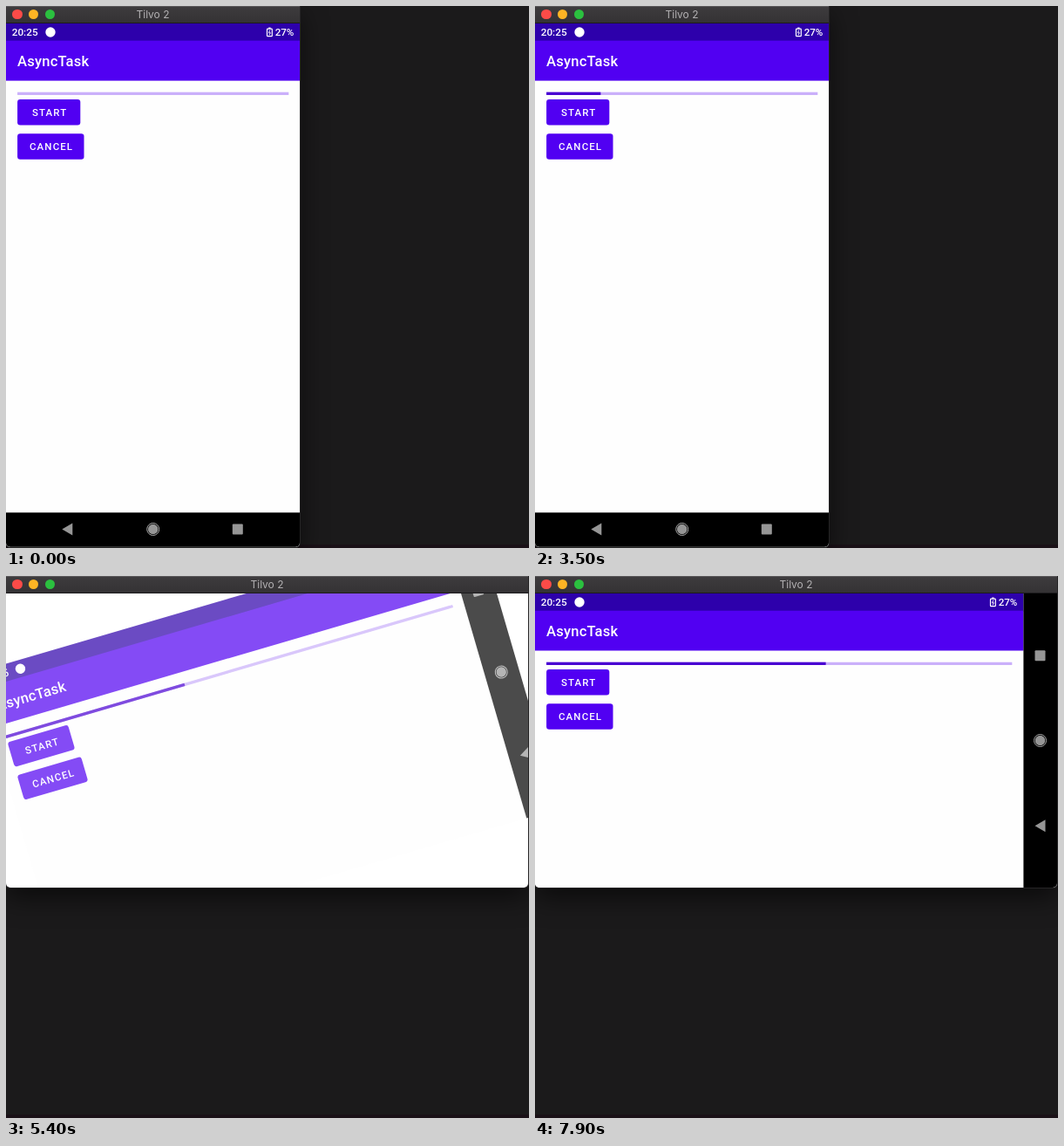
Write an HTML page that moves like this. It is 600 px wide and 621 px high and loops after 8 s.

```html
<!DOCTYPE html>
<html>
<head>
<meta charset="utf-8">
<style>
  html, body { margin: 0; width: 100%; height: 100%; overflow: hidden; }
  body { background: linear-gradient(#1b1a1b 617px, #1a1117 617px); position: relative; }
  #win {
    position: absolute; left: 0; top: 0; overflow: hidden; background: #fff;
    border-radius: 0 0 5px 5px;
    box-shadow: 0 0 0 1px #262526, 0 11px 30px rgba(0, 0, 0, .6);
  }
  #bar {
    position: relative; height: 20px; text-align: center;
    background: linear-gradient(#5a585a 1px, #3d3b3d 1px, #343234 19px, #1c1b1d 19px);
    font: 12px/19px Inter, Roboto, sans-serif; color: #b3b1b3;
  }
  #bar i { position: absolute; top: 3.7px; width: 11.4px; height: 11.4px; border-radius: 50%; }
  svg { display: block; }
  text { font-family: Roboto, sans-serif; font-weight: 500; fill: #fff; }
  .title { font-size: 16.6px; letter-spacing: .2px; }
  .btn { font-size: 11.5px; letter-spacing: 1.1px; }
</style>
</head>
<body>
<div id="win">
  <div id="bar">
    <i style="left:7.3px;background:#fc4b48"></i>
    <i style="left:26px;background:#fdb424"></i>
    <i style="left:44.6px;background:#2bc03f"></i>
    Tilvo 2
  </div>
  <svg id="view" width="600" height="601"></svg>
</div>
<script>
const LOOP = 8000, TURN = 5200, TURN_MS = 372;
const PURPLE = '#5100f2';
const SHORT = 337.4, LONG = 599.8, NAV = 39.4;   // screen sides and navigation bar
const $ = id => document.getElementById(id);

const rect = (x, y, w, h, fill, more = '') =>
  `<rect x="${x}" y="${y}" width="${w}" height="${h}" fill="${fill}" ${more}/>`;
const label = (x, y, s, more) => `<text x="${x}" y="${y}" ${more}>${s}</text>`;

const button = (y, w, textX, s) =>
  rect(13.1, y, w, 29.5, PURPLE, 'rx="3.2"') + label(textX, y + 19.1, s, 'class="btn"');

const navKeys = ([back, home, recent]) => `
  <g fill="#969696">
    <path d="M${back[0] - 6} ${back[1]}l12 -7v14z"/>
    <circle cx="${home[0]}" cy="${home[1]}" r="5.7"/>
    <circle cx="${home[0]}" cy="${home[1]}" r="7" fill="none" stroke="#aaa"/>
    ${rect(recent[0] - 6, recent[1] - 6, 12, 12, '#969696', 'rx="1"')}
  </g>`;

// w, h: whole screen; cw: width left for the app
function screen(id, w, h, cw, navBox, keys) {
  const track = cw - 26.2;
  return `<g id="${id}">
    ${rect(0, 0, w, h, '#fefefe')}
    ${rect(0, 0, cw, 20.5, '#2d00ab')}
    ${rect(0, 19.7, cw, 45.9, PURPLE)}
    ${label(6.7, 14.2, '20:25', 'font-size="11.8"')}
    <circle cx="51" cy="10" r="5.7" fill="#fff"/>
    <g transform="translate(${cw - 38.5} 4.5)" fill="none" stroke="#fff">
      <rect x=".6" y="1.6" width="5.8" height="8.6" rx=".8" stroke-width="1.2"/>
      <path d="M2.3 .7h2.4" stroke-width="1.3"/>
      <path d="M4 3.2L2.5 6.2h2L3.1 8.9" stroke-width=".9"/>
    </g>
    ${label(cw - 7, 14.2, '27%', 'font-size="11.6" text-anchor="end"')}
    ${label(13, 49.2, 'AsyncTask', 'class="title"')}
    ${rect(13.1, 78.7, track, 3.3, '#cab0fa')}
    ${rect(13.1, 78.7, 0, 3.3, '#4900d2', `class="done" data-full="${track}"`)}
    ${button(86.9, 72.2, 30, 'START')}
    ${button(126.2, 76.4, 27, 'CANCEL')}
    ${rect(...navBox, '#000')}
    ${navKeys(keys)}
  </g>`;
}

const navAt = LONG - NAV, mid = navAt + NAV / 2 - .6;
$('view').innerHTML =
  screen('wide', LONG, SHORT, navAt, [navAt, 0, NAV, SHORT], [[mid, 266.3], [mid, 168.5], [mid, 71.3]]) +
  screen('tall', SHORT, LONG, SHORT, [0, navAt, SHORT, NAV], [[70.3, mid], [168.7, mid], [265.8, mid]]);

// cubic-bezier(.4, 0, .2, 1)
function ease(x) {
  let lo = 0, hi = 1;
  for (let i = 0; i < 20; i++) {
    const s = (lo + hi) / 2, r = 1 - s;
    if (1.2 * r * r * s + .6 * r * s * s + s ** 3 < x) lo = s; else hi = s;
  }
  return lo * lo * (3 - 2 * lo);
}
const clamp = v => Math.min(1, Math.max(0, v));

function draw(t) {
  const turned = t >= TURN, since = t - TURN;
  $('win').style.width = (turned ? 599 : 337) + 'px';
  $('win').style.height = (turned ? 357 : 620) + 'px';

  const angle = turned ? -90 * (1 - ease(clamp(since / TURN_MS))) : 0;
  const a = SHORT / 2, b = LONG / 2;
  const shift = turned ? `translate(${b - a} ${a - b}) ` : '';
  $('tall').setAttribute('transform', `${shift}rotate(${angle} ${a} ${b})`);
  $('tall').setAttribute('opacity', clamp(1 - since / 116));
  $('wide').setAttribute('transform', `rotate(${angle} ${b} ${a})`);
  $('wide').setAttribute('opacity', clamp((since - 60) / 200));

  // one step per second; the old layout stays frozen while turning
  const step = Math.max(0, Math.floor(t / 1000 - .95));
  for (const el of document.querySelectorAll('.done')) {
    const shown = el.parentNode.id === 'tall' ? Math.min(step, 3) : step;
    el.setAttribute('width', el.dataset.full * shown / 10);
  }
}

function tick() {
  const t = performance.now() % LOOP;
  draw(Math.floor(t / 100) * 100); // ten pictures a second
  requestAnimationFrame(tick);
}
tick();
</script>
</body>
</html>
```
